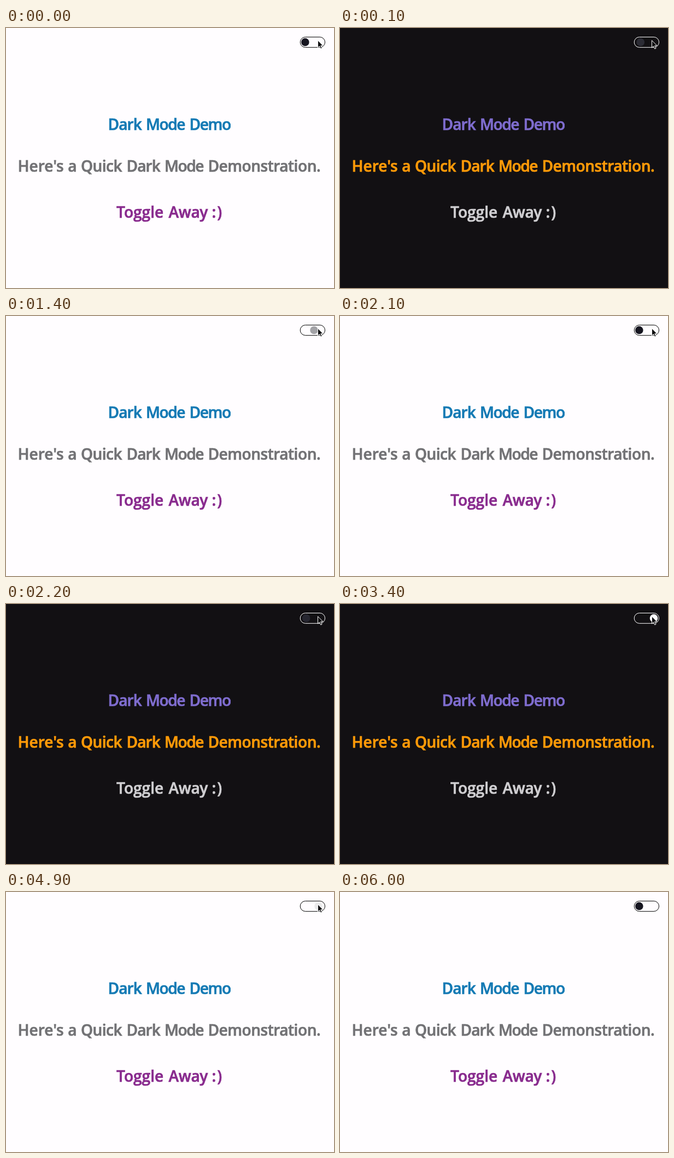
Write an HTML page that moves like this. It is 600 px wide and 474 px high and loops after 6.1 s.

```html
<!DOCTYPE html>
<html lang="en">
<head>
<meta charset="utf-8">
<title>Dark Mode Demo</title>
<style>
  html, body { margin: 0; width: 100%; height: 100%; overflow: hidden; background: #fffdff; }
  svg { display: block; width: 100%; height: 100%; }
  text { font: 600 28px "Open Sans", "Noto Sans", sans-serif; stroke-width: 0.7px; }
</style>
</head>
<body>
<svg id="stage" viewBox="0 0 600 474">
  <rect id="page" width="600" height="474"/>
  <rect id="track" x="538.2" y="16.5" width="45.3" height="18.8" rx="9.4" fill="none"/>
  <circle id="knob" cy="25.8" r="7.3"/>
  <path id="cursor" d="M570.4 22.6v13.4l3.1-2.9 2.2 4.9 2.3-1-2.2-4.8h4.1z"
        fill="#0c0c0e" stroke="#fff" stroke-width="1"/>
</svg>
<script>
const LOOP = 6100, TICK = 100, SLIDE = 300, CURSOR_OUT = 5800;
const KNOB_LEFT = 547.3, KNOB_RIGHT = 574;
const DARK_KNOB = [22, 22, 32], LIGHT_KNOB = [255, 255, 255];

const themes = {
  light: { page: "#fffdff", ink: "#000", lines: ["#147ab4", "#727275", "#892b8e"] },
  dark: { page: "#121013", ink: "#fff", lines: ["#7f6dcf", "#ff9a08", "#d0cfd2"] }
};

const toggles = [
  { at: 70, dark: true },
  { at: 1327, dark: false },
  { at: 2175, dark: true },
  { at: 4870, dark: false }
];

// Each word: text, x, letter spacing
const lines = [
  { y: 186, words: [["Dark", 186.6, -0.9], ["Mode", 256, -1.4], ["Demo", 335.4, -1.3]] },
  { y: 261.6, words: [["Here's", 21.6, 0], ["a", 113.3, 0], ["Quick", 137, -0.5],
    ["Dark", 220.6, -0.9], ["Mode", 290, -1.4], ["Demonstration.", 369.4, -0.45]] },
  { y: 346, words: [["Toggle", 202, 0], ["Away", 297.6, -0.3], [":)", 376.6, 2]] }
];

const byId = id => document.getElementById(id);
const [stage, page, track, knob, cursor] = ["stage", "page", "track", "knob", "cursor"].map(byId);

function add(parent, tag, attrs, content = "") {
  const el = document.createElementNS("http://www.w3.org/2000/svg", tag);
  for (const key in attrs) el.setAttribute(key, attrs[key]);
  el.textContent = content;
  return parent.appendChild(el);
}

const texts = lines.map(({ y, words }) => {
  const text = add(stage, "text", { y });
  words.forEach(([word, x, gap], i) => {
    const last = i === words.length - 1;
    add(text, "tspan", { x, "letter-spacing": gap }, last ? word : word + " ");
  });
  return text;
});

const mix = (a, b, p) => a + (b - a) * p;

// cubic-bezier(.25, .1, .25, 1)
function ease(x) {
  if (x <= 0) return 0;
  if (x >= 1) return 1;
  const curve = (s, a, b) => 3 * (1 - s) ** 2 * s * a + 3 * (1 - s) * s * s * b + s ** 3;
  let low = 0, high = 1;
  for (let i = 0; i < 24; i++) {
    const mid = (low + high) / 2;
    if (curve(mid, 0.25, 0.25) < x) low = mid;
    else high = mid;
  }
  return curve(low, 0.1, 1);
}

function draw(time) {
  const t = Math.floor((time % LOOP) / TICK) * TICK;
  const last = toggles.filter(e => e.at <= t).pop() || { at: -SLIDE, dark: false };
  const theme = last.dark ? themes.dark : themes.light;
  const p = ease((t - last.at) / SLIDE);
  const on = last.dark ? p : 1 - p;

  document.body.style.background = theme.page;
  page.setAttribute("fill", theme.page);
  track.setAttribute("stroke", theme.ink);
  texts.forEach((text, i) => {
    text.setAttribute("fill", theme.lines[i]);
    text.setAttribute("stroke", theme.lines[i]);
  });
  knob.setAttribute("cx", mix(KNOB_LEFT, KNOB_RIGHT, on));
  const tone = DARK_KNOB.map((c, i) => Math.round(mix(c, LIGHT_KNOB[i], on)));
  knob.setAttribute("fill", `rgb(${tone})`);
  cursor.setAttribute("visibility", t < CURSOR_OUT ? "visible" : "hidden");
}

const start = performance.now();
function frame() {
  draw(performance.now() - start);
  requestAnimationFrame(frame);
}
frame();
</script>
</body>
</html>
```
